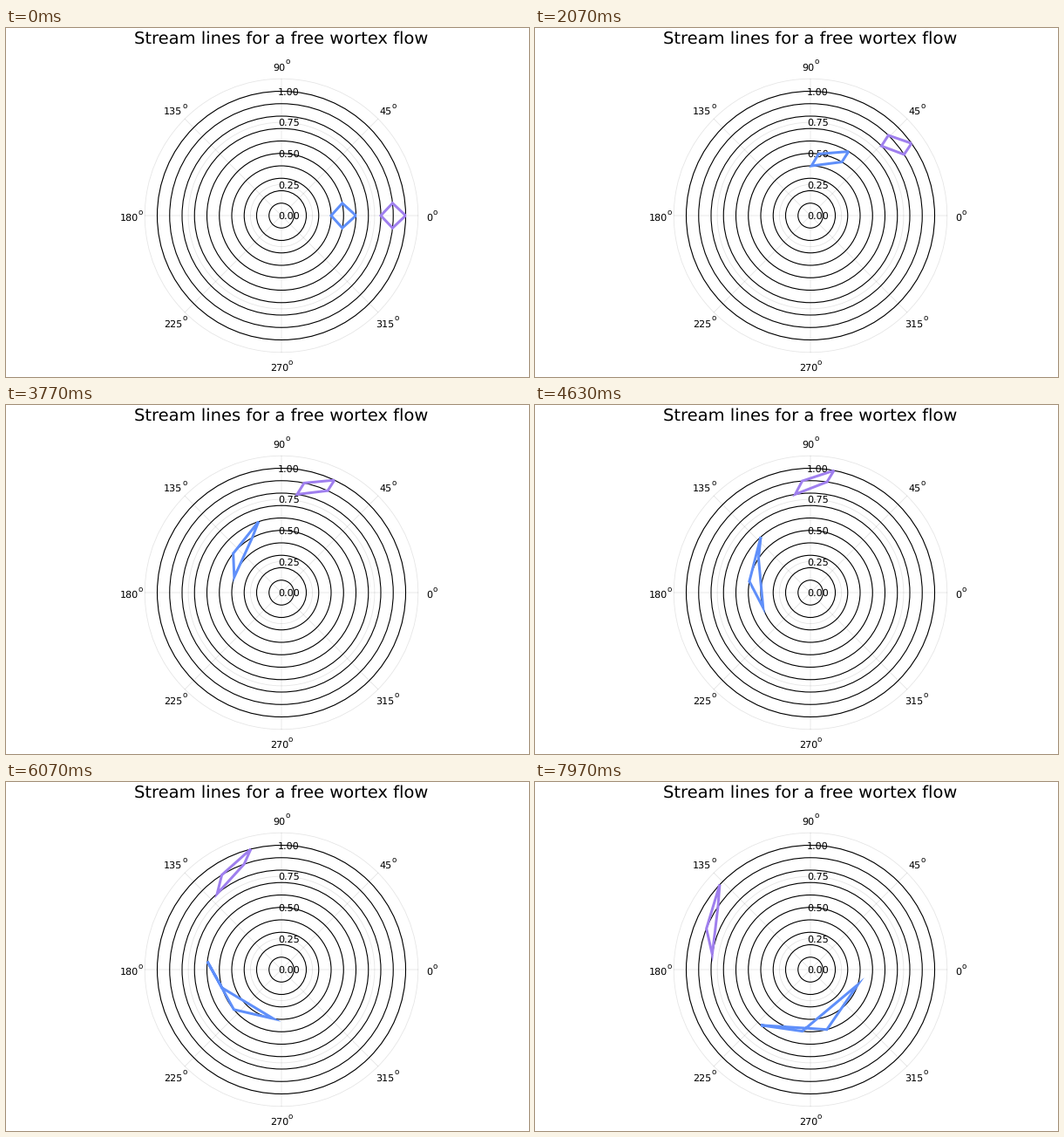
Animation, 600 px wide and 400 px high, one loop 8 s. Source, as a matplotlib script:

```python
import numpy as np
import matplotlib.pyplot as plt
from matplotlib.animation import FuncAnimation
from matplotlib.patches import Circle, Polygon

plt.rcParams.update({
    "font.family": "DejaVu Sans",
    "text.hinting": "none",
    "toolbar": "None",
    "path.simplify": False,
})

W, H, DPI = 600, 400, 100
FRAMES, LOOP_MS = 240, 8000
CX, CY, UNIT = 316, 215, 142.5     # centre and radius 1.0 in pixels
STEP = 0.01                        # arc length moved per frame
HALF = 0.1                         # half diagonal of a fluid element
LINE_W = 3.0
MITER_LIMIT = 10
DIGIT_W, SUP_W = 7.07, 5.35


def pt(px):
    return px * 72 / DPI


def polar(r, theta):
    return np.column_stack([CX + UNIT * r * np.cos(theta),
                            CY - UNIT * r * np.sin(theta)])


fig = plt.figure(figsize=(W / DPI, H / DPI), dpi=DPI, facecolor="white")
ax = fig.add_axes([0, 0, 1, 1])
ax.set(xlim=(0, W), ylim=(H, 0))
ax.axis("off")


def ring(r, **style):
    ax.add_patch(Circle((CX, CY), r * UNIT, fill=False, snap=False, **style))


def label(x, y, text, size=8, ha="left", z=2):
    ax.text(x, y, text, fontsize=size, ha=ha, va="baseline", zorder=z)


def draw_grid():
    faint = dict(color="black", alpha=0.1, lw=0.6, zorder=1)
    for r in (0.25, 0.5, 0.75, 1.0, 1.1):
        ring(r, **faint)
    for deg in range(0, 360, 45):
        a = np.radians(deg)
        x, y = polar(np.array([0, 1.1]), np.array([a, a])).T
        ax.plot(x, y, snap=False, **faint)

        text = str(deg)
        width = DIGIT_W * len(text) + SUP_W
        left = CX + 172.3 * np.cos(a) - width / 2
        base = CY - 172.3 * np.sin(a) + 5.7
        label(left, base, text)
        label(left + DIGIT_W * len(text), base - 7.2, "o", size=6.3)
    for r in (0, 0.25, 0.5, 0.75, 1):
        label(312, CY - r * UNIT + 4, f"{r:.2f}")


class Element:
    """Four-sided fluid element carried around by the vortex."""

    def __init__(self, r, color):
        corner = np.arange(5) * np.pi / 2
        self.r = r + HALF * np.cos(corner)
        self.theta = HALF * np.sin(corner) / self.r
        self.line, = ax.plot([], [], color=color, lw=pt(LINE_W), snap=False,
                             solid_joinstyle="bevel", solid_capstyle="butt",
                             zorder=4)
        self.tips = [ax.add_patch(Polygon(np.zeros((4, 2)), fc=color, lw=0,
                                          snap=False, zorder=4))
                     for _ in range(3)]

    def move(self, frame):
        pts = polar(self.r, self.theta + STEP * frame / self.r)
        self.line.set_data(*pts.T)
        seg = np.diff(pts, axis=0)
        seg /= np.hypot(*seg.T)[:, None]
        for i, tip in enumerate(self.tips):
            tip.set_xy(miter(pts[i + 1], seg[i], seg[i + 1]))
        return [self.line, *self.tips]


def miter(v, d1, d2):
    """Pointed corner outside a join, flat when it would grow too long."""
    side = -np.sign(d1[0] * d2[1] - d1[1] * d2[0])
    o1, o2 = (side * np.array([-d[1], d[0]]) for d in (d1, d2))
    h = LINE_W / 2
    a, b = v + h * o1, v + h * o2
    mid = o1 + o2
    size = np.hypot(*mid)
    if size * MITER_LIMIT < 2:
        return np.array([v, a, b, b])
    return np.array([v, a, v + 2 * h * mid / size**2, b])


draw_grid()
for k in range(1, 11):
    ring(k / 10, color="black", lw=0.8, zorder=3)
label(316, 18, "Stream lines for a free wortex flow", size=14, ha="center")

elements = [Element(0.5, "#5f8ffa"), Element(0.9, "#9f7fee")]


def update(frame):
    return [artist for e in elements for artist in e.move(frame)]


anim = FuncAnimation(fig, update, frames=FRAMES, interval=LOOP_MS / FRAMES,
                     init_func=lambda: update(0), repeat=True, repeat_delay=0,
                     blit=False)
plt.show()
```
